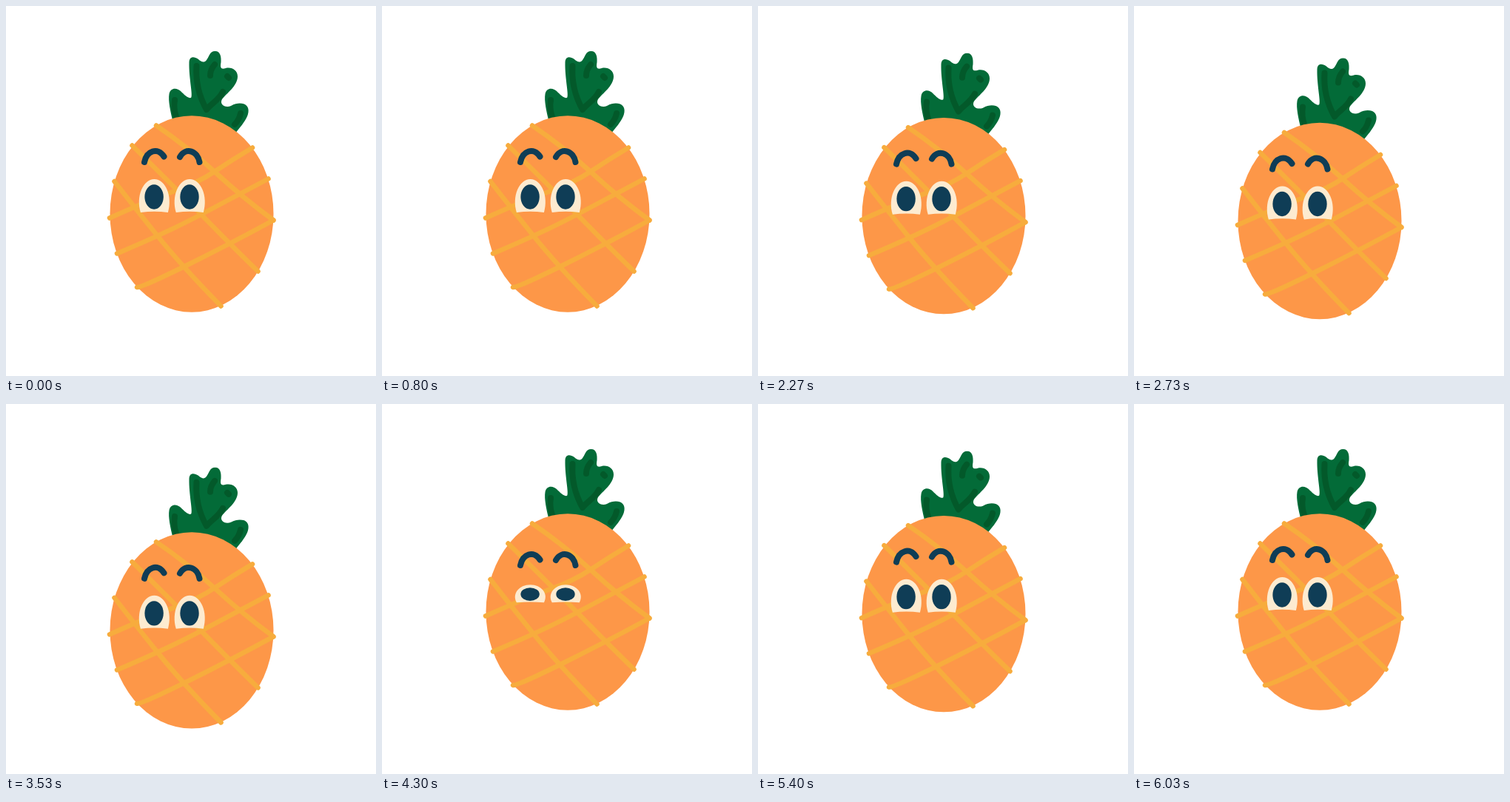
Write an HTML page that moves like this. It is 500x500 px and loops after 6300 ms.

```html
<!DOCTYPE html>
<html lang="en">
<head>
<meta charset="utf-8">
<title>Bouncing pineapple</title>
<style>
  html, body { margin: 0; width: 100%; height: 100%; overflow: hidden; background: #fff; }
  svg { display: block; width: 100%; height: 100%; }
  .line { fill: none; stroke-linecap: round; stroke-linejoin: round; }
</style>
</head>
<body>
<svg viewBox="0 0 500 500">
  <defs>
    <g id="eye">
      <path fill="#fdebd0" d="M-18.5 279C-25 257-15 234 0 234S25 257 18.5 279Q0 276.500-18.5 279Z"/>
      <ellipse cx="-.3" cy="258" rx="12.700" ry="16.700" fill="#0f3d56"/>
    </g>
  </defs>
  <g id="pineapple">
    <path fill="#036b38" d="M226 158C222 142 219 128 220.500 119C222 110 231 110 236 115C241 120 246 125 250 124
      C253 121 247 98 247.500 76C248 68 254 68 260 72C264 76 268 77 271 73C275 68 275 61 282.500 61
      C290 61 291 69 290.500 76C289 84 291 86 297 84C305 82 313 87 313 95C313 108 298 118 292 126
      C288 133 296 138 304 135C311 131 317 131 322 132.500C328 135 329 142 326 149C322 158 316 164 310 172L270 185Z"/>
    <path class="line" stroke="#03592a" stroke-width="8"
      d="M257.500 81C256 104 262 124 271 140C278 131 287 128 293 116M282 79Q276 86 276 94M299 95L301 97M228 127Q226 138 230 150M317 145Q315 154 309 160"/>
    <ellipse cx="251" cy="281" rx="110.500" ry="132.700" fill="#fd9748"/>
    <path class="line" stroke="#f7ac3d" stroke-width="6.500"
      d="M203 161.500Q245 190 283 225T361.500 289.500M170.500 188.500Q217 234 265 283T340.500 358.500M146.500 237Q172 270 205 311T290.500 405.500
         M333 191.500Q307 207 283 223T228 250T140 286.500M354.500 233.500Q310 257 265 281T150 334.500M361.500 289.500Q300 323 241 352T177 380"/>
    <path id="brows" class="line" stroke="#0f3d56" stroke-width="8"
      d="M187 211C190 196 205 190 213.500 203.500M235 204C243 190 259 196 261.500 211"/>
    <g id="eyes">
      <use href="#eye" x="200.400"/>
      <use href="#eye" x="248.300"/>
    </g>
  </g>
</svg>
<script>
  const CYCLE = 2100, DEPTH = 27.5;
  const BLINK = { start: 100, end: 170 };
  const BOUNCES = [170, 1200];
  const HOLDS = [70, 100, 30, 60, 110, 60, 30, 100, 70];
  const part = id => document.getElementById(id);
  const pineapple = part('pineapple'), brows = part('brows'), eyes = part('eyes');

  // Stepped cosine dip: each pose is held for its own time.
  function dip(time) {
    if (time < 0) return 0;
    let end = 0;
    const pose = HOLDS.findIndex(hold => time < (end += hold)) + 1;
    return DEPTH * (1 - Math.cos(Math.PI * pose / 5)) / 2;
  }

  function draw(now) {
    const time = now % CYCLE;
    const blinking = time >= BLINK.start && time < BLINK.end;
    const drop = BOUNCES.reduce((sum, start) => sum + dip(time - start), 0);
    pineapple.setAttribute('transform', `translate(0 ${drop})`);
    brows.setAttribute('transform', `translate(0 ${blinking ? 7 : 0})`);
    eyes.setAttribute('transform', blinking ? 'translate(0 256) scale(1 .53) translate(0 -256)' : '');
  }

  function tick() {
    draw(performance.now());
    requestAnimationFrame(tick);
  }
  tick();
</script>
</body>
</html>
```
